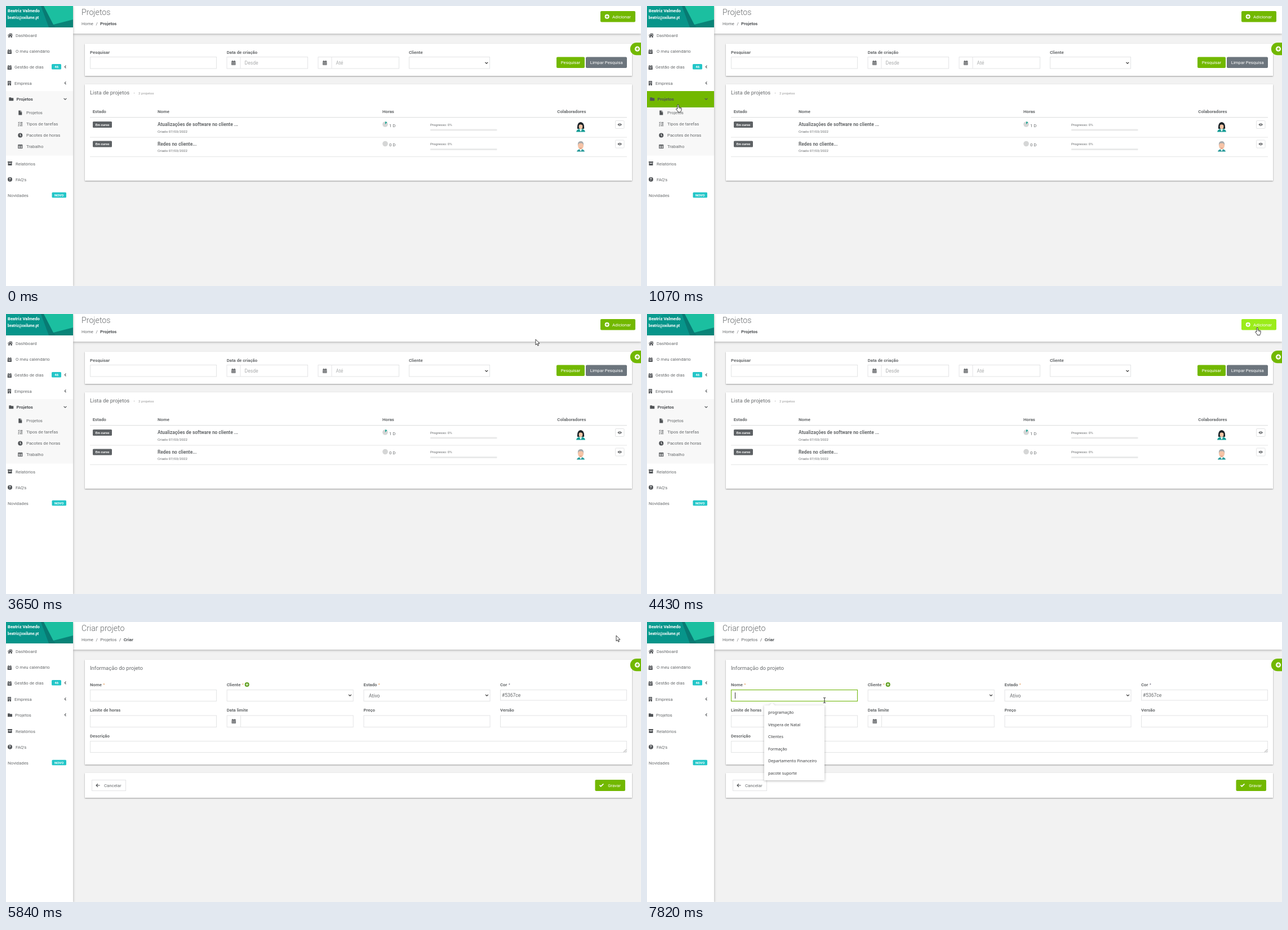
Write an HTML page that moves like this. It is 1127 px wide and 497 px high and loops after 8000 ms.

```html
<!DOCTYPE html>
<html lang="pt">
<head>
<meta charset="utf-8">
<title>Projetos</title>
<style>
html, body { margin: 0; width: 100%; height: 100%; overflow: hidden; background: #f2f2f2; }
svg { display: block; }
text { font-family: Roboto, Arial, sans-serif; white-space: pre; }
.menu text { font-family: "Noto Sans", "Open Sans", sans-serif; }
.card { filter: drop-shadow(0 1px 1px rgba(0, 0, 0, .38)); }
.soft { filter: drop-shadow(0 1px 2px rgba(0, 0, 0, .3)); }
</style>
</head>
<body>
<svg id="stage" width="1127" height="497" viewBox="0 0 1127 497"></svg>
<script>
const INK = '#676a6c', DARK = '#505356', GREEN = '#72b800', TEAL = '#23c6c8', EDGE = '#e3e4e5';
const LOOP = 8000;

const disc = 'M-4 0A4 4 0 1 1 4 0A4 4 0 1 1-4 0Z';
const calendar = 'M-3.6-3H-2.3V-4.1H-1.2V-3H1.2V-4.1H2.3V-3H3.6V-1.6H-3.6ZM-3.6-1H3.6V4H-3.6Z';
const icons = {
  home: 'M-4.6 0L0-4L2-2.3V-3.5H3.2V-1.2L4.6 0L4 .7L0-2.8L-4 .7ZM-3.2 .9L0-1.9L3.2 .9V4H.9V1.5H-.9V4H-3.2Z',
  day: calendar + 'M-1.9 .5H1.9V1.5H-1.9Z',
  grid: calendar + 'M-2.6 0H-1.3V1H-2.6ZM-.6 0H.6V1H-.6ZM1.3 0H2.6V1H1.3ZM-2.6 2H-1.3V3H-2.6ZM-.6 2H.6V3H-.6ZM1.3 2H2.6V3H1.3Z',
  building: 'M-3-4H3V4H-3ZM-1.7-2.8H-.5V-1.6H-1.7ZM.5-2.8H1.7V-1.6H.5ZM-1.7-.7H-.5V.5H-1.7ZM.5-.7H1.7V.5H.5ZM-.6 1.8H.6V4H-.6Z',
  folder: 'M-4-2.3Q-4-3-3.3-3H-.7L.4-2H3.4Q4-2 4-1.4V2.4Q4 3 3.4 3H-3.4Q-4 3-4 2.4Z',
  file: 'M-3-4H.4V-1.3H3V4H-3ZM1-4L3-1.9H1Z',
  list: 'M-4-2.8L-3.3-3.4L-2.7-2.6L-1.6-3.9L-1-3.3L-2.6-1.5ZM-4 .2L-3.3-.4L-2.7 .4L-1.6-.9L-1-.3L-2.6 1.5ZM-3.8 2.4H-2.2V3.8H-3.8ZM0-3.2H4V-2H0ZM0-.5H4V.7H0ZM-1 2.4H4V3.6H-1Z',
  clock: disc + 'M-.5-2.6H.5V-.2L1.8 1L1.2 1.8L-.5 .4Z',
  table: 'M-4-3.5H4V3.5H-4ZM-3-1.4H-.5V.1H-3ZM.5-1.4H3V.1H.5ZM-3 1H-.5V2.5H-3ZM.5 1H3V2.5H.5Z',
  archive: 'M-4-3.5H4V-1.6H-4ZM-3.5-1.1H3.5V3.5H-3.5ZM-1.3-.4H1.3V.4H-1.3Z',
  plus: disc + 'M-.6-2.3H.6V-.6H2.3V.6H.6V2.3H-.6V.6H-2.3V-.6H-.6Z',
  disc,
  check: 'M-4 .3L-2.9-.9L-1.3 .6L2.9-3.2L4-2.1L-1.3 3Z',
  back: 'M-3.8 0L-.4-3.3L.4-2.5L-1.5-.6H3.6V.6H-1.5L.4 2.5L-.4 3.3Z',
  eye: 'M-4 0Q0-5 4 0Q0 5-4 0ZM-1.7 0A1.7 1.7 0 1 0 1.7 0A1.7 1.7 0 1 0-1.7 0ZM-.9 0A.9 .9 0 1 1 .9 0A.9 .9 0 1 1-.9 0Z'
};

// Text is placed by the middle of its capitals.
const text = (x, mid, str, size = 7.8, weight = 400, fill = INK) =>
  `<text x="${x}" y="${mid + size * .355}" font-size="${size}" font-weight="${weight}" fill="${fill}">${str}</text>`;
const bold = (x, mid, str, size = 7.8, fill = INK) => text(x, mid, str, size, 700, fill);
const rect = (x, y, w, h, fill, extra = '') =>
  `<rect x="${x}" y="${y}" width="${w}" height="${h}" fill="${fill}" ${extra}/>`;
const path = (d, fill, extra = '') => `<path d="${d}" fill="${fill}" ${extra}/>`;
const icon = (name, x, y, fill = DARK, scale = 1) =>
  path(icons[name], fill, `fill-rule="evenodd" transform="translate(${x} ${y}) scale(${scale})"`);
const line = (d, stroke, width = 1) => path(d, 'none', `stroke="${stroke}" stroke-width="${width}"`);
const field = (x, y, w, h) => rect(x + .5, y + .5, w - 1, h - 1, '#fff', `stroke="${EDGE}"`);
const card = (y, h) => rect(140, y, 971, h, '#fff', 'class="card"');
const button = (x, y, w, h, fill) => rect(x, y, w, h, fill, 'rx="2"');
const badge = (x, y, w, h, fill, tx, str, size) =>
  rect(x, y, w, h, fill, 'rx="1.5"') + bold(tx, y + h / 2, str, size, '#fff');
const group = (id, body, extra = '') => `<g id="${id}" ${extra}>${body}</g>`;
const chevronLeft = y => line(`M106.4 ${y - 2.3}L104.2 ${y}L106.4 ${y + 2.3}`, DARK, 1.1);
const chevronDown = (x, y, color = '#333') => line(`M${x - 2.4} ${y - 1.2}L${x} ${y + 1.2}L${x + 2.4} ${y - 1.2}`, color, 1.2);

function sidebar() {
  const banner = rect(0, 0, 119, 38, '#07958a') +
    path('M0 0H30L0 26Z', '#0a9c90') + path('M62 0H70L88 38H76Z', '#087a73') +
    path('M84 33L119 23V38H88Z', '#098377') + path('M67 0H119V24L84 33Z', '#1bbfa0') +
    bold(3, 8, 'Beatriz Valmedo', 7.7, '#fff') + bold(3, 20.5, 'beatriz@oxilume.pt', 6.3, '#fff');
  const top = icon('home', 7.5, 52) + text(17, 52, 'Dashboard') +
    icon('day', 6.3, 81) + text(17, 80.7, 'O meu calendário') +
    icon('day', 6.3, 109) + text(15, 108.7, 'Gestão de dias') +
    badge(81, 103, 17, 9.5, TEAL, 86.2, '46', 6) + chevronLeft(108) +
    icon('building', 6, 137) + text(15, 137.3, 'Empresa') + chevronLeft(136.7);
  const open = rect(0, 151, 119, 114.5, '#f8f8f8') +
    rect(0, 151, 119, 29, GREEN, 'id="hoverHead"') + rect(0, 180, 119, 19.5, GREEN, 'id="hoverItem"') +
    icon('folder', 9.3, 165.3) + bold(18.5, 165.3, 'Projetos', 7.8, DARK) + chevronDown(105, 165, DARK) +
    [['file', 'Projetos'], ['list', 'Tipos de tarefas'], ['clock', 'Pacotes de horas'], ['table', 'Trabalho']]
      .map(([name, label], i) => icon(name, 25.3, 189.5 + i * 20) + text(36, 189.7 + i * 20, label)).join('');
  const closed = icon('folder', 7, 165.3) + text(16, 165.3, 'Projetos') + chevronLeft(164.8);
  const tail = icon('archive', 7, 279.5) + text(17, 279.8, 'Relatórios') +
    icon('disc', 7, 307.8) + bold(5.2, 307.8, '?', 6.4, '#fff') + text(17, 308, "FAQ's") +
    text(3, 336.5, 'Novidades') + badge(81.5, 330.7, 25.5, 9.5, TEAL, 86, 'NOVO', 6);
  return rect(0, 0, 119, 497, '#fff', 'class="soft"') + banner + top +
    group('navOpen', open) + group('navClosed', closed) + group('navTail', tail);
}

function avatar(x, y, hair, coat, woman) {
  const shape = woman
    ? path('M-6 3Q-7-8 0-9Q7-8 6 3Z', hair) + path('M-8 8.5Q-7 3 0 3Q7 3 8 8.5Z', coat) +
      path('M-2.5 3.5L0 8L2.5 3.5Z', '#fff') + '<ellipse cy="-1" rx="3.4" ry="4.4" fill="#f3c5a5"/>' +
      path('M-4-2Q-2-7 4-3Q4-8 0-8Q-5-7-4-2Z', hair)
    : path('M-7 9.5Q-6 5 0 5Q6 5 7 9.5Z', coat) + path('M-2.5 4.5H2.5L0 9Z', '#fff') +
      '<ellipse cy="-1" rx="5" ry="6.5" fill="#f6c3a6"/>' +
      path('M-5-1Q-6-9 0-9Q6-9 5-1Q4.5-5 2-5.5H-2Q-4.5-5-5-1Z', hair) + line('M-1.6 3Q0 4 1.6 3', '#b5705d', .7);
  return `<g transform="translate(${x} ${y})">${shape}</g>`;
}

function row(y, name, days, person) {
  return badge(154, y - 5.5, 34, 11, '#5e6265', 158.8, 'Em curso', 5.8) +
    bold(269, y, name, 8.35) + text(269, y + 12.2, 'Criado 07/03/2022', 6.25) +
    `<circle cx="673" cy="${y - .5}" r="4.8" fill="#d5d6d6"/>` +
    (days ? path(`M673 ${y - .5}V${y - 5.3}A4.8 4.8 0 0 1 676.4 ${y - 3.9}Z`, '#1aa593') : '') +
    text(680, y + 1.5, days + ' D') + text(753, y, 'Progresso: 0%', 6.1) +
    rect(753, y + 8, 118.5, 3, '#e9eaea', 'rx="1"') + person +
    rect(1081.5, y - 7, 15.5, 14, '#fff', `rx="1.5" stroke="${EDGE}"`) + icon('eye', 1089.2, y, DARK, .95) +
    rect(149, y + 22, 953, 1, '#e5e6e6');
}

function listPage() {
  const dateBox = (x, w, hint) => field(x, 90, w, 21.5) + rect(x + 24, 90, 1, 21, EDGE) +
    icon('grid', x + 12.3, 100.8) + text(x + 32, 100.7, hint, 8.6, 400, '#a9abac');
  const search = card(67, 57) + bold(149, 82, 'Pesquisar') + field(149, 90, 225, 21.5) +
    bold(391.7, 82, 'Data de criação') + dateBox(391.5, 144.5, 'Desde') + dateBox(553.5, 144.5, 'Até') +
    bold(715, 82, 'Cliente') + field(715, 90, 144, 21.5) + chevronDown(852.8, 101) +
    button(977, 90.5, 50, 19.5, GREEN) + text(984.7, 100.3, 'Pesquisar', 7.8, 400, '#fff') +
    button(1029, 90.5, 73, 19.5, '#6c757d') + text(1036.7, 100.3, 'Limpar Pesquisa', 7.8, 400, '#fff');
  const heads = [[153.7, 'Estado'], [269, 'Nome'], [668, 'Horas'], [978.3, 'Colaboradores']]
    .map(([x, label]) => bold(x, 187, label)).join('');
  const table = card(139, 171) + text(149, 153.5, 'Lista de projetos', 9.5) +
    text(226.5, 154.5, '•', 6, 400, '#999') + text(235, 154.7, '2 projetos', 6.2, 400, '#999') +
    heads + rect(149, 197.3, 953, 1, '#d9dadb') +
    row(210.5, 'Atualizações de software no cliente ...', 1, avatar(1020, 215, '#1c2328', '#159c95', true)) +
    row(245, 'Redes no cliente...', 0, avatar(1020, 249, '#a5a9ab', '#2c9c9c', false));
  return text(134, 10.8, 'Projetos', 14.2, 300) + text(134, 31.2, 'Home') + text(159.5, 31.2, '/') +
    bold(167, 31.2, 'Projetos', 7.8, DARK) +
    button(1055, 9, 62, 19.5, GREEN).replace('<rect', '<rect id="addBox"') +
    group('addLabel', icon('plus', 1066.7, 18.8, 'inherit') + text(1076, 18.8, 'Adicionar', 7.8, 400, 'inherit'), 'fill="#fff"') +
    search + table;
}

function formCards() {
  const columns = [149, 391.7, 634.5, 877];
  const label = (col, y, str) => bold(columns[col], y, str);
  const star = x => bold(x, 110.8, '*', 6, '#e08a3c');
  const boxes = columns.map((x, i) => field(x, 120, 225, i < 3 ? 21 : 19.5) + field(x, 165.5, 225, 21.5)).join('');
  return card(67, 186) + text(149, 82, 'Informação do projeto', 9.5) + boxes +
    label(0, 111, 'Nome') + star(172.5) + label(1, 111, 'Cliente') + star(419) +
    icon('plus', 427.7, 111, '#5f9f1e') + label(2, 111, 'Estado') + star(660.7) +
    label(3, 111, 'Cor') + bold(892, 110.8, '*', 6, '#5d5a6c') +
    chevronDown(610.5, 130) + chevronDown(853.4, 130) +
    text(644, 130.5, 'Ativo', 8.6) + text(880, 129.7, '#5367ce', 8.5) +
    label(0, 156.5, 'Limite de horas') + label(1, 156.5, 'Data limite') +
    label(2, 156.5, 'Preço') + label(3, 156.5, 'Versão') +
    rect(416, 165.5, 1, 21, EDGE) + icon('grid', 404.2, 176) +
    label(0, 202, 'Descrição') + field(149, 211, 953, 21) +
    line('M1096 231L1101 226M1098.7 231L1101 228.7', '#777', .7) +
    card(268, 44) + field(152, 280, 61, 20) + icon('back', 163, 290) + text(174, 290.2, 'Cancelar') +
    button(1045.5, 280, 53.5, 20, GREEN) + icon('check', 1057, 290, '#fff') + text(1068.3, 290.2, 'Gravar', 7.8, 400, '#fff');
}

function suggestions() {
  const items = ['programação', 'Véspera de Natal', 'Clientes', 'Formação', 'Departamento Financeiro', 'pacote suporte'];
  return path('M208 148H217L222 143.5L227 148H315V281H208Z', '#fff', 'class="soft"') +
    items.map((item, i) => text(215, 160.7 + i * 21.45, item, 7.2, 400, '#3a3c3e')).join('');
}

const cursors =
  group('arrow', path('M0 0V9.9L2.3 7.8L3.8 11.3L5.4 10.6L3.9 7.2H7Z', '#fff', 'stroke="#111" stroke-width=".8"')) +
  group('hand', path('M-1 8V1.2A1.1 1.1 0 0 1 1.2 1.2V5Q2.1 4.3 2.9 5.2Q3.8 4.7 4.5 5.5Q5.6 5.2 6.1 6.2V9Q6 11 4.9 12.2V13.5H0V12.3L-3.1 8.6Q-3.7 7.2-2.6 7Q-1.8 7-1 8Z',
    '#fff', 'stroke="#111" stroke-width=".8"') + line('M2.9 5.4V7.6M4.6 5.8V7.7', '#111', .6)) +
  group('beam', line('M-2-4.5H-.7L0-4L.7-4.5H2M0-4V4M-2 4.5H-.7L0 4L.7 4.5H2', '#111', .9));

document.getElementById('stage').innerHTML =
  rect(0, 0, 1127, 497, '#f2f2f2') + rect(119, 0, 1008, 49, '#fff', 'class="soft"') + sidebar() +
  group('listPage', listPage()) +
  group('formHead', text(134, 10.8, 'Criar projeto', 14.2, 300) + text(134, 31.2, 'Home') + text(159.5, 31.2, '/') +
    text(167.3, 31.2, 'Projetos') + text(201, 31.2, '/', 7.8, 500) + bold(208.7, 31.2, 'Criar', 7.8, DARK)) +
  group('formCards', formCards()) +
  group('float', path('M1127 65H1119A11 11 0 0 0 1119 87.3H1127Z', GREEN) + icon('plus', 1120.5, 76.2, '#fff', 1.15)) +
  rect(149.5, 120.5, 224, 20, 'none', 'id="focus" stroke="#7dbd22" stroke-width="1.2"') +
  rect(156, 125, 1, 11, '#333', 'id="caret"') +
  group('menu', suggestions(), 'class="menu"') + group('cursor', cursors);

// Pointer stops: time, x, y
const stops = [
  [460, 1060, 472], [540, 985, 425], [620, 850, 340], [700, 660, 250], [770, 450, 182],
  [850, 270, 144], [930, 145, 139], [1000, 78, 160], [1070, 55, 175], [1160, 54, 175], [1270, 54, 174],
  [1770, 54, 177], [1850, 54, 182], [1920, 53, 187], [2000, 53, 189],
  [3180, 75, 194], [3260, 140, 190], [3340, 270, 165], [3420, 440, 130], [3500, 620, 96],
  [3570, 790, 66], [3650, 940, 45], [3730, 990, 39], [3810, 1011, 37],
  [3960, 1030, 35], [4030, 1055, 33], [4110, 1072, 32], [4270, 1077, 28], [4350, 1081, 25], [4430, 1083, 24],
  [6020, 1050, 40], [6090, 950, 75], [6170, 815, 115], [6250, 680, 150], [6330, 560, 174],
  [6410, 460, 182], [6480, 385, 176], [6560, 335, 156], [6640, 315, 139]
];

const el = id => document.getElementById(id);
const show = (id, on) => { el(id).style.display = on ? '' : 'none'; };
const stepped = (t, from, to) => Math.min(1, Math.max(0, Math.floor((t - from) / 80 + 1) * 80 / (to - from + 80)));
const mix = (a, b, k) => `rgb(${a.map((v, i) => Math.round(v + (b[i] - v) * k))})`;

function draw(t) {
  const form = t >= 5610;
  const loaded = !form || t >= 5840;
  const stop = stops.filter(s => s[0] <= t).pop();
  const [, x, y] = stop || [0, -50, -50];
  const inNav = !form && x >= 0 && x < 119;
  const head = inNav && y >= 151 && y < 180;
  const item = inNav && y >= 180 && y < 199.5;
  const onAdd = t >= 4270 && t < 5460;

  show('listPage', !form);
  show('navOpen', !form);
  show('navClosed', form);
  show('formHead', form);
  show('formCards', form && loaded);
  show('float', loaded);
  el('navTail').setAttribute('transform', `translate(0 ${form ? -86 : 0})`);
  show('hoverHead', head);
  show('hoverItem', item);
  el('addBox').setAttribute('fill', mix([114, 184, 0], [168, 253, 34], stepped(t, 4270, 4510)));
  el('addLabel').setAttribute('fill', mix([255, 255, 255], [236, 255, 200], stepped(t, 4910, 5090)));

  show('focus', t >= 6810);
  show('caret', t >= 6810 && (t < 7360 || t >= 7820));
  show('menu', t >= 6890);

  const kind = t >= 6640 ? 'beam' : head || item || onAdd ? 'hand' : 'arrow';
  for (const id of ['arrow', 'hand', 'beam']) show(id, stop && id === kind);
  el('cursor').setAttribute('transform', `translate(${x} ${y})`);
}

const start = performance.now();
function tick() {
  draw((performance.now() - start) % LOOP);
  requestAnimationFrame(tick);
}
tick();
</script>
</body>
</html>
```
